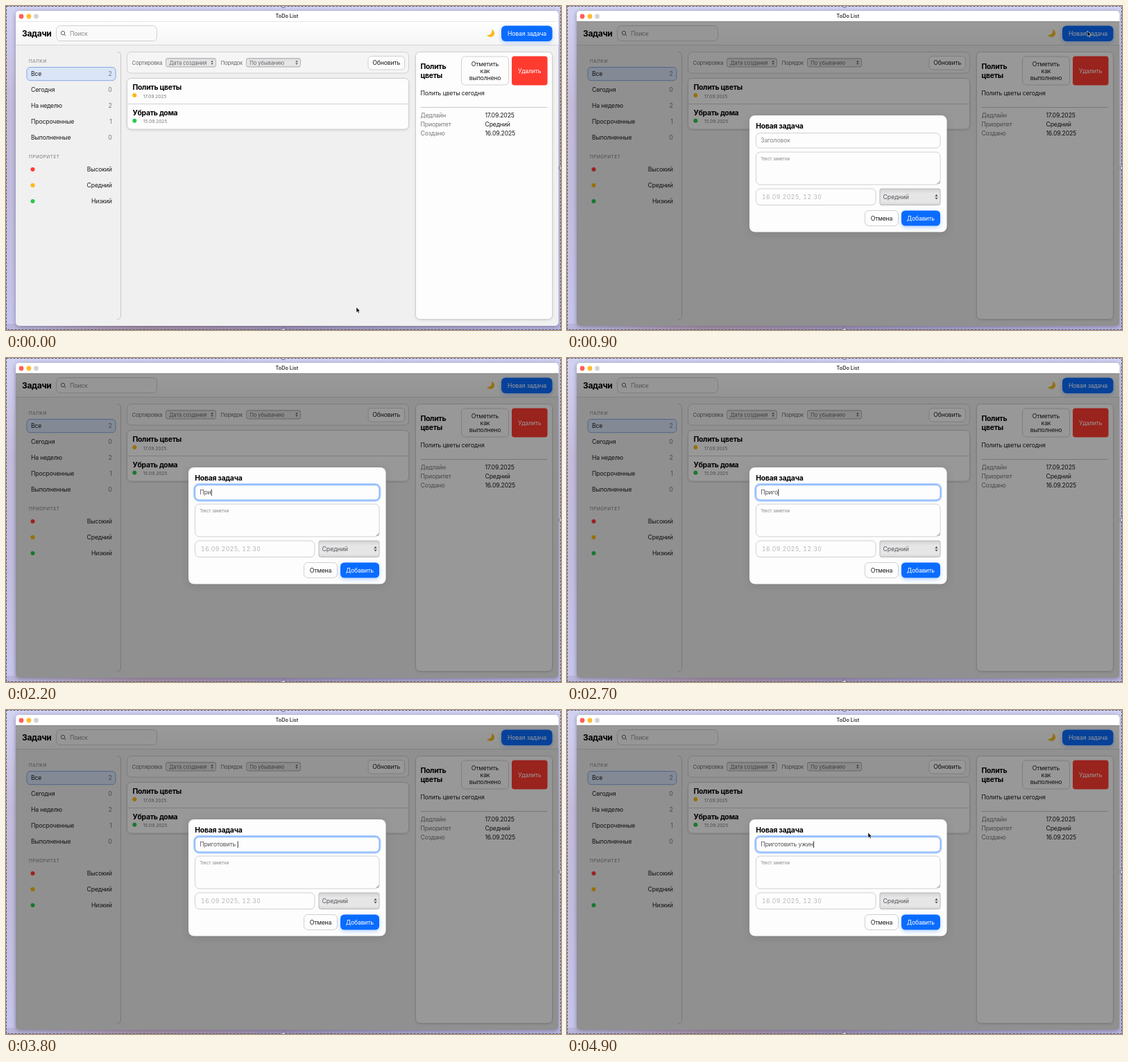
An HTML page that plays this animation: 800 by 468 pixels, repeating every 5000 ms.

```html
<!DOCTYPE html>
<html lang="ru">
<head>
<meta charset="utf-8">
<title>ToDo List</title>
<style>
html, body { margin: 0; width: 100%; height: 100%; overflow: hidden; }
svg { display: block; width: 800px; height: 468px; }
text { font: 8.7px Inter, "Open Sans", sans-serif; letter-spacing: -.02em; fill: #1c1c1e; white-space: pre; }
.mid { text-anchor: middle; }
.end { text-anchor: end; }
.bold { font-size: 10.4px; font-weight: 700; letter-spacing: -.025em; fill: #000; }
.head { font-size: 12px; }
.cap { font-size: 6.4px; letter-spacing: .55px; fill: #77777b; }
.small { font-size: 6.5px; letter-spacing: .012em; fill: #77777b; }
.label { font-size: 7.7px; fill: #66666a; }
.pick { font-size: 7.6px; letter-spacing: -.01em; fill: #66666a; }
.dim { fill: #77777b; }
.hint { fill: #88888c; }
.light { fill: #fff; }
.card { fill: #fdfdfd; stroke: #d0d0d2; }
.flat { fill: #f5f5f5; }
.shade { filter: drop-shadow(0 1px 1.5px rgba(0,0,0,.12)); }
.line { fill: none; stroke: #c8c8ca; }
.blue { fill: #0a6cff; filter: drop-shadow(0 2px 3px rgba(10,108,255,.3)); }
</style>
</head>
<body>
<svg id="stage" viewBox="0 0 800 468">
  <defs>
    <linearGradient id="desk" x2="0" y2="1">
      <stop offset="0" stop-color="#d2d3f2"/><stop offset=".3" stop-color="#c4bdda"/>
      <stop offset=".6" stop-color="#c2bddd"/><stop offset="1" stop-color="#c6c6ec"/>
    </linearGradient>
    <linearGradient id="foot">
      <stop offset=".02" stop-color="#b9b6da"/><stop offset=".25" stop-color="#a892a6"/>
      <stop offset=".5" stop-color="#9f95b8"/><stop offset="1" stop-color="#b8b6de"/>
    </linearGradient>
    <linearGradient id="bar" x2="0" y2="1">
      <stop offset="0" stop-color="#fff"/><stop offset="1" stop-color="#f5f5f5"/>
    </linearGradient>
    <linearGradient id="grey" x2="0" y2="1">
      <stop offset="0" stop-color="#d2d2d4"/><stop offset=".3" stop-color="#e6e6e7"/>
      <stop offset=".8" stop-color="#e6e6e7"/><stop offset="1" stop-color="#d6d6d8"/>
    </linearGradient>
    <clipPath id="win"><rect x="14" y="7" width="782.5" height="455" rx="5"/></clipPath>
  </defs>
</svg>
<script>
const stage = document.getElementById('stage');
const $ = id => document.getElementById(id);

const text = (x, y, str, cls = '', more = '') => `<text x="${x}" y="${y}" class="${cls}" ${more}>${str}</text>`;
const box = (x, y, w, h, r, cls = '', more = '') =>
  `<rect x="${x}" y="${y}" width="${w}" height="${h}" rx="${r}" class="${cls}" ${more}/>`;
const dot = (x, y, r, color) => `<circle cx="${x}" cy="${y}" r="${r}" fill="${color}"/>`;
const rule = (x1, x2, y, color) => `<path d="M${x1} ${y}H${x2}" stroke="${color}"/>`;
const arrows = (x, y, k = 1) =>
  `<path transform="translate(${x} ${y}) scale(${k})" d="M-2-.8 0-3.4 2-.8ZM-2 .8 0 3.4 2 .8Z" fill="#555"/>`;
const select = (x, w, str) =>
  box(x, 75.5, w, 12.5, 2.5, '', 'fill="url(#grey)" stroke="#b4b4b6"') +
  text(x + 4.7, 84.6, str, 'pick') + arrows(x + w - 5.5, 81.8, .9);

const RED = '#ff3b30', YELLOW = '#fdb813', GREEN = '#28c850';

const frame = box(0, 0, 800, 468, 0, '', 'fill="url(#desk)"') +
  box(0, 459, 800, 9, 0, '', 'fill="url(#foot)"') +
  box(14, 7, 782.5, 455, 5, '', 'fill="#f0f0f0" style="filter:drop-shadow(0 1px 3px rgba(40,30,70,.4))"') +
  `<g clip-path="url(#win)">${box(14, 7, 783, 15.5, 0, '', 'fill="#fff"')}
   ${box(14, 22.5, 783, 34, 0, '', 'fill="url(#bar)"')}${rule(14, 797, 22.5, '#e6e6e6')}${rule(14, 797, 56.5, '#d6d6d8')}</g>` +
  dot(22, 15, 3.4, '#ff5f57') + dot(33, 15, 3.4, '#febc2e') + dot(43.5, 15, 3.4, '#d2d2d4') +
  text(405, 17.4, 'ToDo List', 'mid', 'style="font-size:7.3px;font-weight:600;letter-spacing:0;fill:#333"');

const header = text(23, 44, 'Задачи', 'bold head') +
  box(72.5, 28.5, 145, 22, 6, 'card', 'style="fill:#fafafa"') +
  '<path d="M84.2 41.2 86 43" stroke="#555"/><circle cx="82" cy="39" r="2.7" fill="none" stroke="#555" stroke-width=".9"/>' +
  text(92, 42.9, 'Поиск', 'hint') +
  '<path d="M700 33.8C705 36 705.5 42 701 44.2 697.5 45.8 694 44 693 41.8 697 43 701.5 40 700 33.8Z" fill="#fbb91c"/>' +
  box(714, 28.5, 73.5, 22.5, 6, 'blue', 'id="create"') + text(751, 43, 'Новая задача', 'mid light');

const folders = [['Все', 2], ['Сегодня', 0], ['На неделю', 2], ['Просроченные', 1], ['Выполненные', 0]];
const levels = [['Высокий', RED], ['Средний', YELLOW], ['Низкий', GREEN]];
const sidebar = '<path d="M160 66.5Q165.500 66.500 165.500 72V447Q165.500 452.500 160 452.500" class="line"/>' +
  text(33, 82, 'ПАПКИ', 'cap') + box(30, 88.5, 128, 19.2, 5, '', 'fill="#dae5f8" stroke="#86a9e2"') +
  folders.map(([name, n], i) => text(36, 101.4 + i * 23, name) + text(152.5, 101.4 + i * 23, n, 'end dim')).join('') +
  text(33, 219.6, 'ПРИОРИТЕТ', 'cap') +
  levels.map(([name, c], i) => dot(38.5, 236 + i * 23, 3, c) + text(152.8, 239.2 + i * 23, name, 'end')).join('');

const tasks = [['Полить цветы', '17.09.2025', YELLOW], ['Убрать дома', '15.09.2025', GREEN]];
const list = box(174.5, 66.5, 406, 30.5, 6, 'card flat') +
  text(181.5, 84.6, 'Сортировка', 'label') + select(230.5, 72, 'Дата создания') +
  text(309.5, 84.6, 'Порядок', 'label') + select(346.5, 78, 'По убыванию') +
  box(522, 72.5, 52.5, 19.5, 5, 'card') + text(548.2, 85.3, 'Обновить', 'mid') +
  box(174.5, 104.5, 406, 73.5, 6, 'card shade') + rule(175, 580, 141.5, '#d2d2d4') +
  tasks.map(([name, date, c], i) => text(182.5, 121.3 + i * 36.8, name, 'bold') +
    dot(185.3, 129 + i * 36.8, 3, c) + text(197.8, 132.5 + i * 36.8, date, 'small')).join('');

const facts = [['Дедлайн', '17.09.2025'], ['Приоритет', 'Средний'], ['Создано', '16.09.2025']];
const panel = box(590.5, 66.5, 197, 386, 6, 'card shade') +
  text(597.5, 91.3, 'Полить', 'bold') + text(597.5, 104.3, 'цветы', 'bold') +
  box(656.5, 73, 68, 41, 5, 'card') +
  ['Отметить', 'как', 'выполнено'].map((s, i) => text(690.5, 87.2 + i * 10, s, 'mid')).join('') +
  box(729, 72.5, 51.5, 42, 4, '', `fill="${RED}"`) + text(754.7, 96.9, 'Удалить', 'mid light') +
  text(597.5, 129, 'Полить цветы сегодня') + rule(597.5, 780, 146.5, '#c8c8ca') +
  facts.map(([k, v], i) => text(597.5, 160.6 + i * 13.2, k, 'dim') + text(690.5, 160.6 + i * 13.2, v)).join('');

const modal = '<g id="modal">' +
  '<g clip-path="url(#win)">' + box(14, 22, 783, 440, 0, '', 'fill="#000" opacity=".4"') + '</g>' +
  box(263, 158, 284.5, 168.5, 8, '', 'fill="#fdfdfd" style="filter:drop-shadow(0 2px 6px rgba(0,0,0,.1))"') +
  text(272.3, 176.8, 'Новая задача', 'bold') +
  box(271.3, 182.3, 267.9, 23.9, 7, '', 'id="ring" fill="none" stroke="#a9cbff" stroke-width="2.4"') +
  box(272.5, 183.5, 265.5, 21.5, 6, 'card', 'id="field"') +
  text(279.2, 197.4, '', '', 'id="typed"') + box(0, 189.5, .9, 9.5, 0, '', 'id="caret" fill="#222"') +
  box(272.5, 211, 265.5, 47, 6, 'card') +
  text(279.2, 222.8, 'Текст заметки', 'hint', 'style="font-size:6.2px"') +
  '<path d="M533.500 257 537.500 253M535.700 257 537.500 255.200" stroke="#666" stroke-width=".7"/>' +
  box(272.5, 264, 172.5, 23.5, 6, 'card') +
  text(281, 279.2, '16.09.2025, 12:30', '',
    'style="font-weight:300;font-variant-numeric:tabular-nums;letter-spacing:.42px;fill:#a2a2a6"') +
  box(451, 264, 87, 23.5, 2.5, '', 'fill="url(#grey)" stroke="#b8b8ba"') +
  text(455.5, 279, 'Средний', '', 'style="letter-spacing:0;fill:#55555a"') + arrows(532.5, 275.8, 1.1) +
  box(429.5, 295.5, 48, 22, 5.5, 'card') + text(453.5, 309.8, 'Отмена', 'mid') +
  box(482, 295.5, 56, 22, 5.5, 'blue') + text(510, 309.8, 'Добавить', 'mid light') + '</g>';

const edge = '<path d="M.5.5H799.500V467.500H.5Z" fill="none" stroke="#55556a" stroke-dasharray="3 2"/>' +
  [[400, 0], [400, 467.5], [799.5, 234]].map(([x, y]) =>
    `<circle cx="${x}" cy="${y}" r="2.500" fill="#c8c8d4" stroke="#55556a" stroke-width=".7"/>`).join('');

const pointer = '<path id="pointer" d="M0 0V7.800L1.800 6.200 3 8.900 4.300 8.300 3.100 5.700H5.500Z" fill="#000" stroke="#fff" stroke-width=".6"/>';

stage.insertAdjacentHTML('beforeend', frame + header + sidebar + list + panel + modal + edge + pointer);

const LOOP = 5000, OPEN = 900, FOCUS = 1600;
const phrase = 'Приготовить ужин';
// [time, letters typed by then]
const typing = [[1600, 0], [2200, 3], [3200, 8], [3800, 12], [4600, 16], [LOOP, 16]];
// [time, x, y]
const route = [[0, 505, 435], [100, 505, 435], [700, 750, 36], [1000, 750, 36], [1500, 430, 192],
  [4600, 430, 192], [4900, 434, 177], [LOOP, 434, 177]];

function at(keys, t, ease = k => k) {
  const i = keys.findIndex(k => k[0] > t), [a, b] = [keys[i - 1], keys[i]];
  const k = ease((t - a[0]) / (b[0] - a[0]));
  return a.slice(1).map((v, j) => v + (b[j + 1] - v) * k);
}
const smooth = k => k * k * (3 - 2 * k);
const show = (id, on) => { $(id).style.display = on ? '' : 'none'; };

function draw(now) {
  const t = Math.floor(now % LOOP / 100) * 100;
  const [x, y] = at(route, t, smooth);
  const focused = t >= FOCUS;
  const count = Math.floor(at(typing, Math.max(t, FOCUS))[0] + 1e-6);
  const typed = $('typed');

  $('create').style.fill = t < OPEN && x > 714 && y < 51 ? '#075ad8' : '';
  show('modal', t >= OPEN);
  show('ring', focused);
  show('caret', focused);
  $('field').style.stroke = focused ? '#78aef8' : '';
  typed.textContent = count ? phrase.slice(0, count) : 'Заголовок';
  typed.style.fill = count ? '#55555a' : '#88888c';
  $('caret').setAttribute('x', 279.4 + (count ? typed.getComputedTextLength() : 0));
  $('pointer').setAttribute('transform', `translate(${x} ${y})`);
  show('pointer', count === 0 || t >= 4700);
  requestAnimationFrame(draw);
}
requestAnimationFrame(draw);
</script>
</body>
</html>
```
